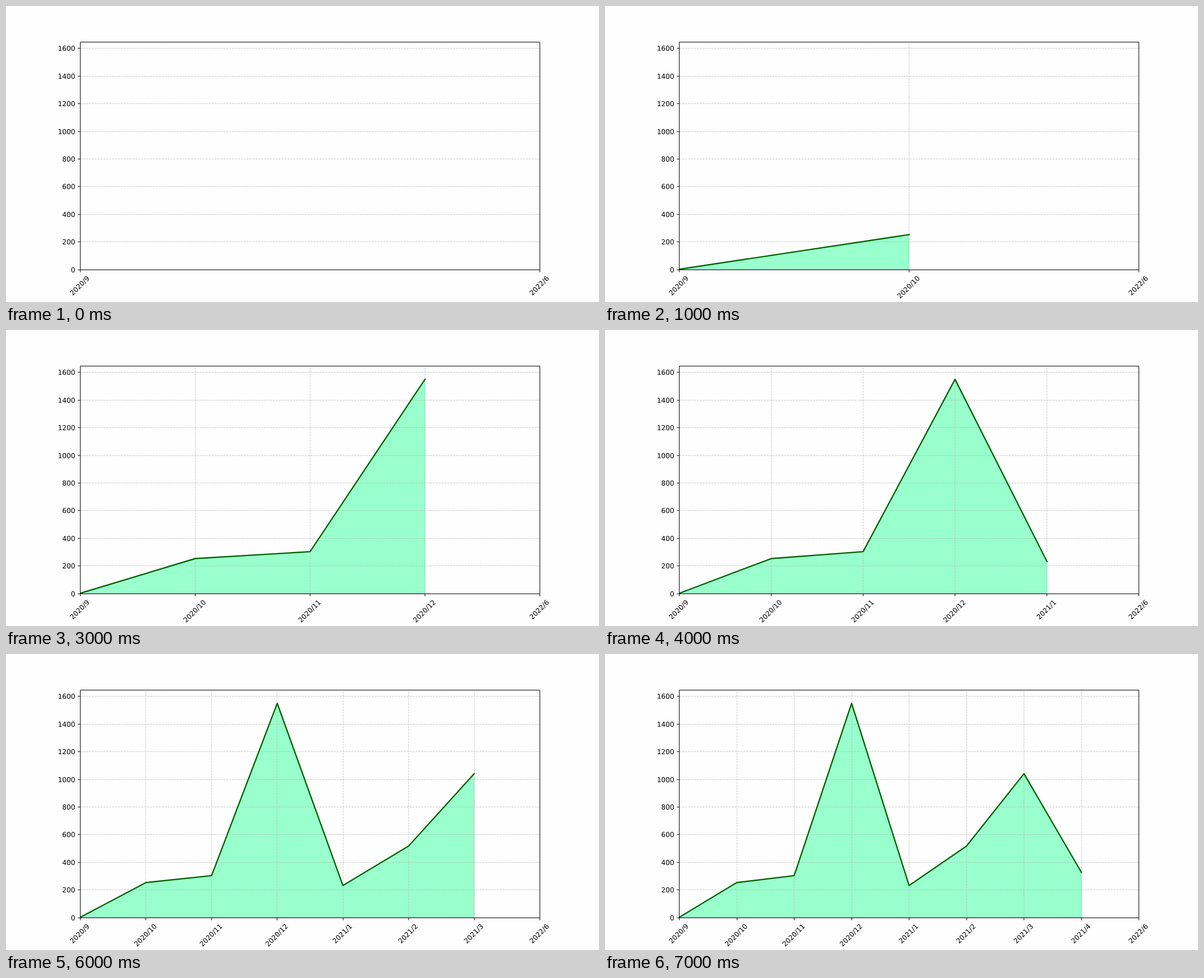
An HTML page that plays this animation: 1058 by 529 pixels, repeating every 8 s.

```html
<!DOCTYPE html>
<html lang="en">
<head>
<meta charset="utf-8">
<title>Monthly area chart</title>
<style>
  html, body { margin: 0; width: 100%; height: 100%; overflow: hidden; background: #fefefe; }
  svg { display: block; width: 1058px; height: 529px; }
  text { font: 12.25px "DejaVu Sans", sans-serif; fill: #000; text-rendering: geometricPrecision; }
  .grid { stroke: #b0b0b0; stroke-opacity: .65; stroke-dasharray: 3.63 1.57; }
  .axis { fill: none; stroke: #000; }
  .area { fill: #00ff7f; stroke: #00ff7f; opacity: 1; fill-opacity: .4; stroke-opacity: .4; }
  .line { fill: none; stroke: #006400; stroke-width: 2.4; stroke-linejoin: round; stroke-linecap: square; }
</style>
</head>
<body>
<svg id="chart" viewBox="0 0 1058 529"></svg>
<script>
const LEFT = 132.5, RIGHT = 952.5, TOP = 64.5, BASE = 471;
const STEP_MS = 1000;
const values = [2, 253, 303, 1550, 232, 517, 1041, 327];
const months = ["2020/9", "2020/10", "2020/11", "2020/12", "2021/1", "2021/2", "2021/3", "2021/4"];
const lastMonth = "2022/6";

const chart = document.getElementById("chart");
const snap = v => Math.floor(v) + 0.5;
const yOf = v => BASE - v * 0.247;
const path = (cls, d) => `<path class="${cls}" d="${d}"/>`;

function yAxis() {
  let out = "";
  for (let v = 0; v <= 1600; v += 200) {
    const y = snap(yOf(v));
    if (v) out += path("grid", `M${LEFT} ${y}H${RIGHT}`);
    out += path("axis", `M${LEFT} ${y}h-4.3`);
    out += `<text x="123.6" y="${y + 4.4}" text-anchor="end">${v}</text>`;
  }
  return out;
}

function xTick(x, label) {
  // Centre of the rotated label drops as the label gets longer.
  const cy = 499.6 + (label.length - 6) * 2.7;
  return path("axis", `M${snap(x)} ${snap(BASE)}v4.3`) +
    `<text transform="translate(${x - 1.1} ${cy}) rotate(-45)" y="4.4" text-anchor="middle">${label}</text>`;
}

function draw(count) {
  const xOf = i => LEFT + (RIGHT - LEFT) * i / (count + 1);
  const points = values.slice(0, count + 1).map((v, i) => `${xOf(i)} ${yOf(v)}`).join("L");
  let area = "", line = "", grid = "", ticks = xTick(RIGHT, lastMonth);

  if (count) {
    area = path("area", `M${LEFT} ${BASE}L${points}V${BASE}Z`);
    line = path("line", "M" + points);
  }
  for (let i = 0; i <= count; i++) {
    if (i) grid += path("grid", `M${snap(xOf(i))} ${BASE}V${TOP}`);
    ticks += xTick(xOf(i), months[i]);
  }
  const frame = path("axis", `M${LEFT} ${TOP}H${RIGHT}V${snap(BASE)}H${LEFT}Z`);
  chart.innerHTML =
    `<clipPath id="plot"><path d="M${LEFT} ${TOP}H${RIGHT}V${BASE}H${LEFT}Z"/></clipPath>` +
    `<g clip-path="url(#plot)">${area}</g>${grid}${yAxis()}` +
    `<g clip-path="url(#plot)">${line}</g>${ticks}${frame}`;
}

let shown = -1;
const start = performance.now();
function tick() {
  const count = Math.floor(Math.max(0, performance.now() - start) / STEP_MS) % values.length;
  if (count !== shown) draw(shown = count);
  requestAnimationFrame(tick);
}
tick();
</script>
</body>
</html>
```
